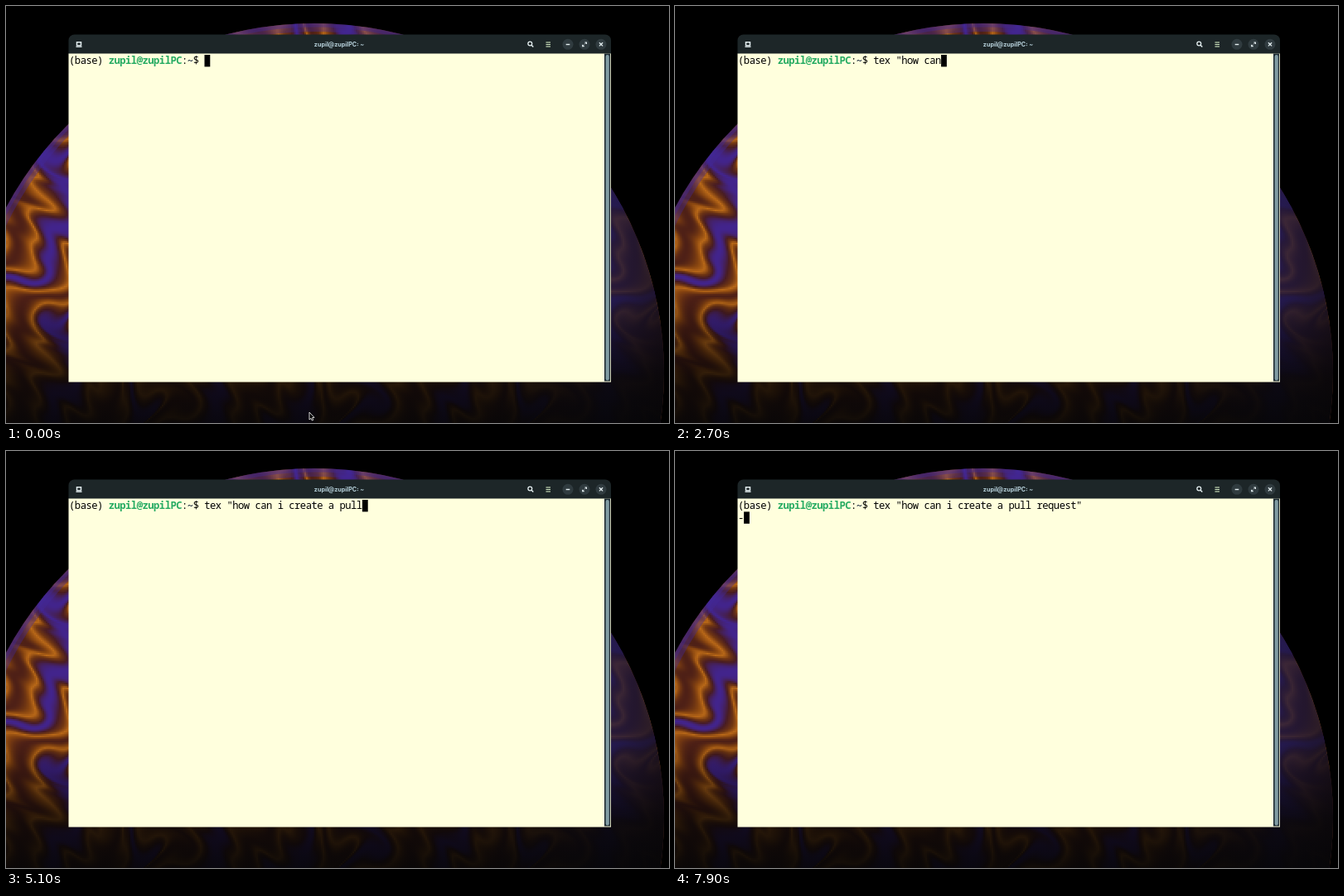
Write an HTML page with a canvas that moves like this. It is 800 px wide and 504 px high and loops after 8 s.

```html
<!DOCTYPE html>
<html lang="en">
<head>
<meta charset="utf-8">
<title>Terminal</title>
<style>
html, body { margin: 0; width: 100%; height: 100%; overflow: hidden; background: #000; }
canvas { display: block; width: 800px; height: 504px; }
</style>
</head>
<body>
<canvas id="stage" width="800" height="504"></canvas>
<script>
const LOOP = 8000, BLINK = 500;
const CELL = 6.8, LEFT = 76.3, TOP = 59, ROW = 14.4;
const USER = 'zupil', HOST = 'zupilPC';
const COMMAND = 'tex "how can i create a pull request"';
// One key time per character, in tenths of a second
const KEYS = [
  10, 11, 12, 13, 17,
  21, 22, 23, 24, 25, 26, 27, 28, 29, 30, 31,
  33, 34, 35, 37, 38, 39, 42, 45,
  47, 49, 50, 51, 52,
  54, 57, 57, 59, 60, 61, 62, 68
].map(k => k * 100);
const ENTER = 6900, SPIN = 7200;
const PROMPT_END = 24;
const MARBLE = [[66, 36, 140], [72, 28, 34], [112, 54, 18], [184, 104, 24], [134, 68, 16], [78, 32, 22]];

const stage = document.getElementById('stage');
const backdrop = document.createElement('canvas');
backdrop.width = 800;
backdrop.height = 504;
let c = backdrop.getContext('2d');

function fade(x0, y0, x1, y1, stops) {
  const g = c.createLinearGradient(x0, y0, x1, y1);
  stops.forEach(([at, color]) => g.addColorStop(at, color));
  c.fillStyle = g;
  c.fillRect(0, 0, 800, 504);
}

function line(color, width, ...points) {
  c.strokeStyle = color;
  c.lineWidth = width;
  c.beginPath();
  points.forEach(([x, y]) => c.lineTo(x, y));
  c.stroke();
}

function disc(x, y, r, color) {
  c.fillStyle = color;
  c.beginPath();
  c.arc(x, y, r, 0, 7);
  c.fill();
}

function box(x, y, w, h, r, color) {
  c.fillStyle = color;
  c.beginPath();
  c.roundRect(x, y, w, h, r);
  c.fill();
}

// Colour of the swirled surface: sine-warped bands through the palette
function marble(x, y) {
  for (let i = 1; i < 5; i++) {
    x += 26 / i * Math.sin(y * i / 31 + i * 1.9);
    y += 30 / i * Math.sin(x * i / 37 + i * 2.7);
  }
  const n = MARBLE.length - 1;
  const v = n * (.5 + .5 * Math.sin(x / 15 + y / 33));
  const k = Math.min(n - 1, Math.floor(v));
  const mix = MARBLE[k].map((a, i) => Math.round(a + (MARBLE[k + 1][i] - a) * (v - k)));
  return `rgb(${mix})`;
}

function drawPlanet() {
  c.fillStyle = '#000';
  c.fillRect(0, 0, 800, 504);
  c.save();
  c.beginPath();
  c.arc(372, 443, 422, 0, 7);
  c.clip();
  for (let y = 20; y < 504; y += 2) {
    for (let x = 0; x < 800; x += 2) {
      const covered = x > 78 && x < 726 && y > 44 && y < 450;
      if (covered) continue;
      c.fillStyle = marble(x, y);
      c.fillRect(x, y, 2, 2);
    }
  }
  // Violet rim
  for (const width of [9, 20]) {
    c.strokeStyle = 'rgba(66,42,150,.4)';
    c.lineWidth = width;
    c.beginPath();
    c.arc(372, 443, 422, 3.3, 5.4);
    c.stroke();
  }
  fade(560, 0, 790, 0, [[0, 'rgba(30,22,52,0)'], [.72, 'rgba(30,24,68,.78)'], [1, 'rgba(26,18,34,.9)']]);
  fade(0, 350, 0, 504, [[0, 'rgba(0,0,0,0)'], [.35, 'rgba(3,2,3,.42)'], [.65, 'rgba(6,5,5,.8)'], [1, 'rgba(5,5,6,.93)']]);
  c.restore();
}

function drawIcons() {
  const ink = '#e4eef0';
  c.strokeStyle = ink;
  c.lineWidth = 1.5;
  c.strokeRect(85.5, 43.8, 5, 4);
  line(ink, 1.2, [84.5, 49.3], [91.5, 49.3]);

  c.lineWidth = 1.3;
  c.beginPath();
  c.arc(632.3, 45.5, 2.4, 0, 7);
  c.stroke();
  line(ink, 1.5, [634, 47.2], [636.3, 49.5]);
  for (const y of [44, 46.5, 49]) line('#cfe6c0', 1.1, [651.5, y], [657, y]);

  for (const x of [678, 698, 718]) disc(x, 46.3, 6.5, '#303b3f');
  line(ink, 1.4, [675.7, 46.5], [680.3, 46.5]);
  line(ink, 1.2, [698.4, 44], [700.4, 44], [700.4, 46]);
  line(ink, 1.2, [695.7, 46.7], [695.7, 48.7], [697.7, 48.7]);
  line(ink, .9, [698.6, 45.8], [700.4, 44]);
  line(ink, .9, [695.7, 48.7], [697.5, 46.9]);
  line(ink, 1.3, [715.9, 44.2], [720.1, 48.4]);
  line(ink, 1.3, [720.1, 44.2], [715.9, 48.4]);
}

function drawWindow() {
  box(75.5, 34.5, 654.5, 24, [7, 7, 0, 0], '#1d2628');
  c.fillStyle = '#ffffdd';
  c.fillRect(75.5, 57.5, 654.5, 397);
  c.fillStyle = '#1d2a32';
  c.fillRect(722, 57.5, 7.2, 396);
  box(723.6, 59, 4.2, 393.5, 2, '#809ba3');
  c.font = '700 7.2px Inter, sans-serif';
  c.textAlign = 'center';
  c.fillStyle = '#b9d3dd';
  c.fillText(`${USER}@${HOST}: ~`, 402, 48.6);
  drawIcons();
}

function put(text, col, row, color = '#000', weight = 500) {
  c.font = `${weight} 12.2px "Noto Sans Mono", monospace`;
  c.textAlign = 'center';
  c.fillStyle = color;
  [...text].forEach((ch, i) => c.fillText(ch, LEFT + (col + i + .5) * CELL, TOP + 11.4 + row * ROW));
}

function drawPointer() {
  c.beginPath();
  [[366, 491], [366, 500], [368, 498.3], [369.3, 501], [370.7, 500.4], [369.5, 497.6], [372, 497.4]]
    .forEach(([x, y]) => c.lineTo(x, y));
  c.closePath();
  c.fillStyle = '#000';
  c.fill();
  c.strokeStyle = '#e8e8e8';
  c.lineWidth = .9;
  c.stroke();
}

function cursorOn(t, typed) {
  if (t >= ENTER) return true;
  if (!typed) return t < 200 || t >= 700;
  return Math.floor((t - KEYS[typed - 1]) / BLINK) % 2 === 0;
}

function draw(t) {
  const typed = KEYS.filter(k => k <= t).length;
  c.drawImage(backdrop, 0, 0);
  put(COMMAND.slice(0, typed), PROMPT_END, 0);

  let col = PROMPT_END + typed, row = 0;
  if (t >= ENTER) {
    col = 0;
    row = 1;
  }
  if (t >= SPIN) {
    put('\\|/-'[Math.floor((t - SPIN) / 100) % 4], 0, 1);
    col = 1;
  }
  if (cursorOn(t, typed)) {
    c.fillStyle = '#000';
    c.fillRect(LEFT + col * CELL, TOP + row * ROW, CELL, ROW);
  }
  if (t < 200) drawPointer();
}

drawPlanet();
drawWindow();
put('(base)', 0, 0);
put(`${USER}@${HOST}`, 7, 0, '#26ab62', 700);
put(':', 20, 0);
put('~', 21, 0, '#1c2b40', 700);
put('$', 22, 0);

c = stage.getContext('2d');
const start = performance.now();
function tick() {
  draw((performance.now() - start) % LOOP);
  requestAnimationFrame(tick);
}
tick();
</script>
</body>
</html>
```
